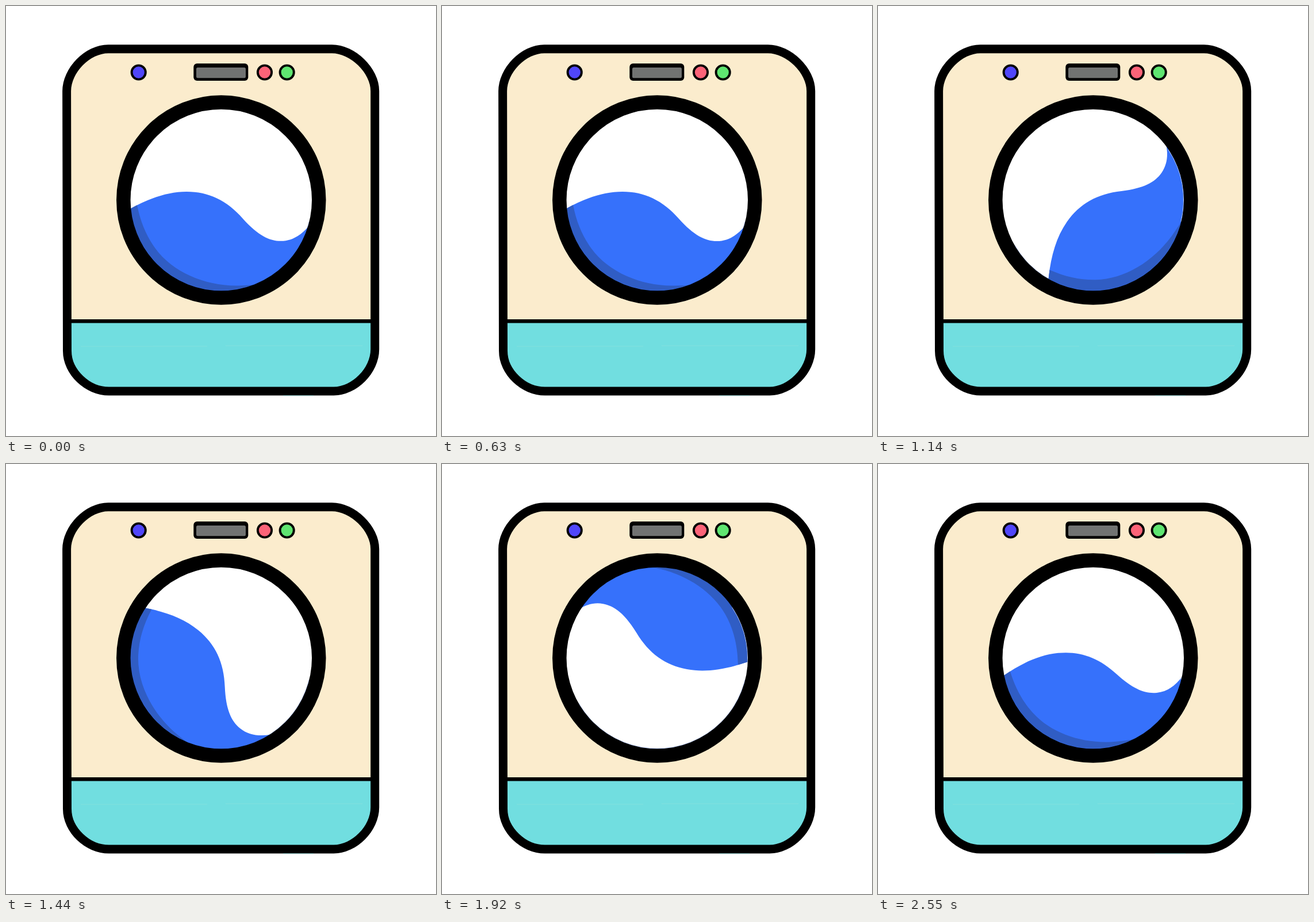
Write an HTML page that moves like this. It is 748 by 748 pixels and loops after 2580 ms.

```html
<!DOCTYPE html>
<html lang="en">
<head>
<meta charset="utf-8">
<title>Washing machine</title>
<style>
  html, body { margin: 0; width: 100%; height: 100%; overflow: hidden; background: #fff; }
  svg { display: block; width: 100%; height: 100%; }
</style>
</head>
<body>
<svg viewBox="0 0 748 748">
  <defs>
    <path id="body" d="M178 74.7 H567 C603 74.7 641.7 112 641.7 148 V597 C641.7 634 606 670 570 670
      H179 C142 670 106.5 637 106.5 600 L105.6 148 C105.6 112 142 74.7 178 74.7 Z"/>
    <clipPath id="bodyClip"><use href="#body"/></clipPath>
    <clipPath id="glass"><circle cx="374.3" cy="337.5" r="159"/></clipPath>
    <path id="wave" d="M196 363 L217 352 C250 334 282 323 314 323 C352 323 384 338 412 370
      C438 399 458 409 478 409 C497 409 513 399 526 384 L546 357 L570 545 H175 Z"/>
    <clipPath id="waveClip"><use href="#wave"/></clipPath>
  </defs>

  <g clip-path="url(#bodyClip)">
    <rect width="748" height="748" fill="#fbeccd"/>
    <rect y="548" width="748" height="140" fill="#71dee0"/>
    <path d="M130 592 H350 M382 591 H620" stroke="#8fe3dd" opacity=".6"/>
    <path d="M100 548.3 H648" stroke="#000" stroke-width="6.6"/>
  </g>
  <use href="#body" fill="none" stroke="#000" stroke-width="15"/>
  <path d="M482 678 H535" stroke="#71dee0" opacity=".6"/>

  <rect x="326.3" y="100" width="95" height="30" rx="6"/>
  <rect x="331" y="107" width="86" height="18.3" rx="2.5" fill="#717372"/>
  <g stroke="#000" stroke-width="3.9">
    <circle cx="230.7" cy="115.5" r="12.1" fill="#5046fa"/>
    <circle cx="450" cy="115.5" r="12.1" fill="#fb6378"/>
    <circle cx="488.7" cy="115.5" r="12.1" fill="#5fe571"/>
  </g>

  <circle cx="374.3" cy="337.5" r="170" fill="#fff"/>
  <g clip-path="url(#glass)">
    <g id="water">
      <use href="#wave" fill="#3671fb"/>
      <path clip-path="url(#waveClip)" fill="#305dc4" d="M225 325 L228 346 C234 376 244 400 260 422
        C290 463 345 486 400 486.5 Q425 487 450 483 V545 H160 V325 Z"/>
    </g>
  </g>
  <g fill="none" stroke-width=".9">
    <path d="M504.8 249.5 A157.4 157.4 0 0 1 527 375.6" stroke="#fff" opacity=".8"/>
    <path d="M527 375.6 A157.4 157.4 0 0 1 238 416.2" stroke="#3671fb" opacity=".4"/>
  </g>
  <circle cx="374.3" cy="337.5" r="170" fill="none" stroke="#000" stroke-width="24.5"/>
</svg>
<script>
  const LOOP = 2580, STEP = 30;
  const SWING = 480, SPIN = 1129, BRAKE = 2160;  // phase starts in ms
  const HIGH = 47, LOW = -58.5, SPEED = .3145;   // degrees, degrees per ms
  const water = document.getElementById('water');

  // Ease out from one angle to another, then rest there
  const glide = (from, to, elapsed, duration, power) =>
    to + (from - to) * Math.max(0, 1 - elapsed / duration) ** power;

  const spin = t => LOW + SPEED * (t - SPIN);

  function angleAt(t) {
    if (t < SWING) t += LOOP;  // the braking phase runs across the loop point
    if (t < SPIN) return glide(HIGH, LOW, t - SWING, 540, 1.81);
    if (t < BRAKE) return spin(t);
    return glide(spin(BRAKE), HIGH + 360, t - BRAKE, 780, 1.42);
  }

  function draw() {
    const t = Math.floor(performance.now() % LOOP / STEP) * STEP;
    water.setAttribute('transform', `rotate(${angleAt(t)} 371.6 335)`);
    requestAnimationFrame(draw);
  }
  draw();
</script>
</body>
</html>
```
